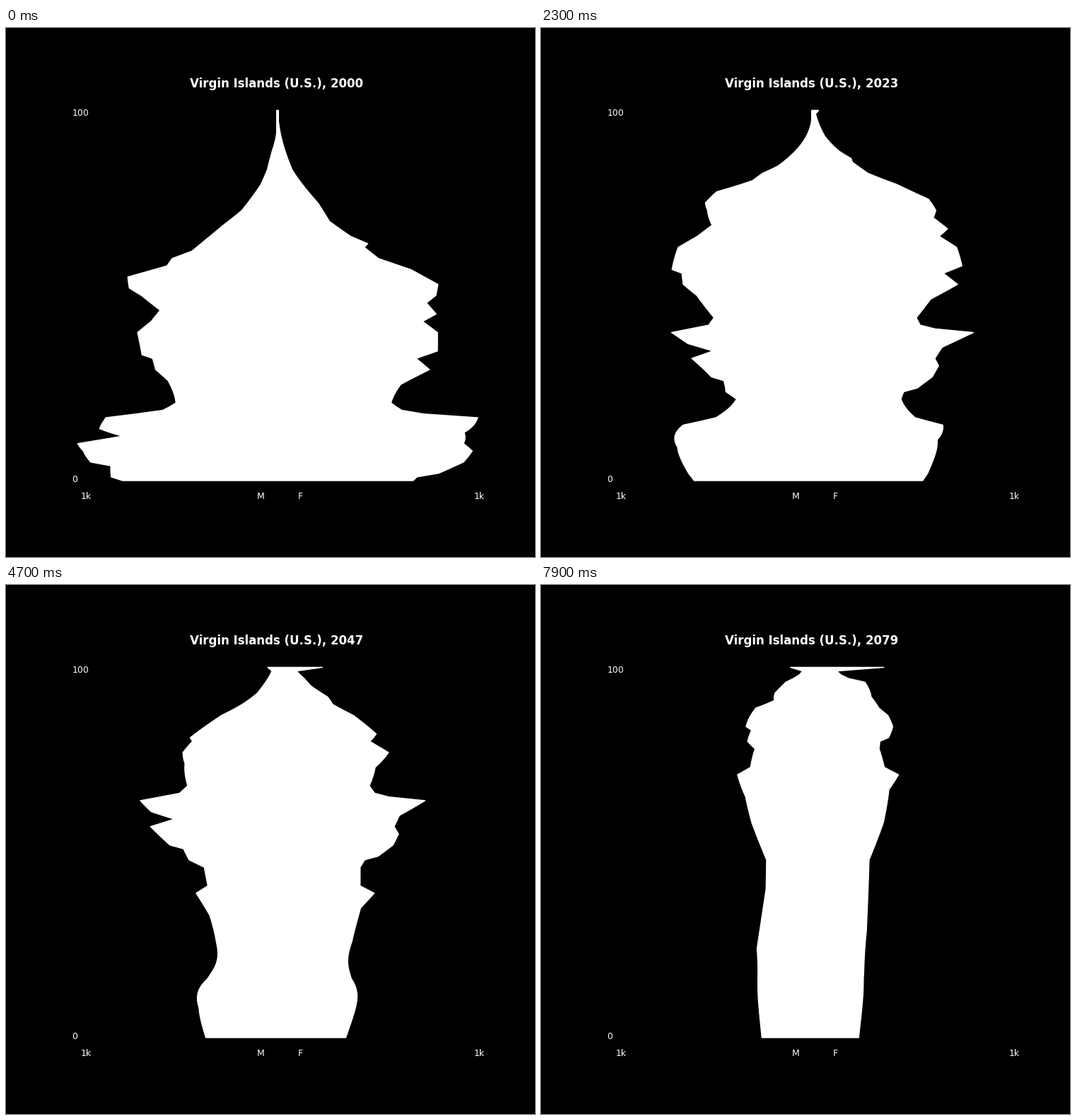
A matplotlib script for the animation above (8 s loop, 748 by 748 pixels).

```python
import numpy as np
import matplotlib.pyplot as plt
from matplotlib.animation import FuncAnimation

SIZE, DPI = 748, 100
FIRST, FRAMES = 2000, 80
MID = 384                    # x of the axis between the sexes
BASE, STEP = 640, 5.236      # y of age 0 and pixels per year of age
EDGE = 0.7                   # half of the outline width
OLDEST = 100                 # open group: this age and above
AGES = np.arange(OLDEST + 4)

# Key points (birth year, adult cohort size in pixels).
MEN = [
    (1900, 40), (1911, 60), (1916, 50), (1920, 54), (1927, 76), (1931, 101),
    (1938, 139), (1940, 167), (1942, 172), (1945, 228), (1948, 223),
    (1950, 204), (1954, 176), (1957, 191), (1960, 214), (1966, 213),
    (1967, 197), (1970, 193), (1973, 172), (1979, 148), (1981, 157),
    (1983, 215), (1986, 193), (1988, 156), (1990, 190), (1995, 159),
    (1996, 139), (1999, 131), (2001, 109), (2006, 105), (2008, 123),
    (2014, 103), (2021, 90), (2031, 67), (2039, 67), (2055, 79), (2079, 67)]
WOMEN = [
    (1900, 50), (1916, 60), (1925, 93), (1930, 101), (1934, 129),
    (1936, 154), (1937, 146), (1940, 163), (1943, 209), (1947, 244),
    (1950, 237), (1952, 221), (1955, 233), (1957, 212), (1960, 232),
    (1965, 230), (1967, 199), (1970, 217), (1974, 174), (1979, 151),
    (1981, 156), (1982, 177), (1983, 232), (1987, 186), (1990, 175),
    (1992, 180), (1995, 170), (1998, 147), (1999, 127), (2001, 120),
    (2006, 119), (2008, 139), (2012, 119), (2021, 105), (2031, 82),
    (2050, 77), (2079, 61)]

# Share of extra children who leave as young adults, by birth year.
BOYS = [(1980, 0.45), (1992, 0.6), (2002, 0.9), (2031, 1), (2047, 0.4),
        (2055, 0.08)]
GIRLS = [(2031, 0.56), (2047, 0.25), (2063, 0.08)]
AWAY = [(2000, 0.1), (2040, 0)]     # men absent around age 29


def curve(x, points):
    return np.interp(x, *zip(*points))


def survival(year, age, mode, gain, spread):
    """Gompertz curve whose modal age of death rises every year."""
    late = mode + gain * (year - FIRST)
    return np.exp(-np.exp((age - late) / spread))


def children(born, age, points):
    return 1 + curve(born, points) / (1 + np.exp((age - 16) / 2.6))


def half_width(size):
    """Visible widths for ages 0 to 99 and the open group, less the outline."""
    size = np.r_[size[:OLDEST], size[OLDEST:].sum()]
    return np.maximum(size, 2) - EDGE


def pyramid(year):
    born = year - AGES
    men = (curve(born, MEN) * children(born, AGES, BOYS)
           * survival(year, AGES, 82.2, 0.106, 10)
           * (1 - curve(born, AWAY) * np.exp(-((AGES - 29) / 15) ** 2)))
    women = (curve(born, WOMEN) * children(born, AGES, GIRLS)
             * survival(year, AGES, 83.5, 0.14, 11.5))
    return half_width(men), half_width(women)


fig = plt.figure(figsize=(SIZE / DPI, SIZE / DPI), dpi=DPI, facecolor="black")
ax = fig.add_axes([0, 0, 1, 1])
ax.set(xlim=(0, SIZE), ylim=(SIZE, 0))
ax.axis("off")


def label(x, y, text, **style):
    style = {"fontsize": 9, "ha": "center", **style}
    return ax.text(x, y, text, color="white", family="DejaVu Sans",
                   va="baseline", **style)


title = label(382.8, 84, "", fontsize=12, weight="bold")
label(93.5, 124, "100", ha="left")
label(93.5, 642, "0", ha="left")
for x, text in ((113, "1k"), (359.7, "M"), (416.5, "F"), (669.5, "1k")):
    label(x, 666, text)

shape, = ax.fill([0, 0, 0], [0, 0, 0], facecolor="white", edgecolor="white",
                 linewidth=1, joinstyle="round")
y = BASE - STEP * np.arange(OLDEST + 1)
outline_y = np.r_[y, y[::-1]]


def draw(i):
    men, women = pyramid(FIRST + i)
    x = np.r_[MID - men, (MID + women)[::-1]]
    shape.set_xy(np.column_stack([x, outline_y]))
    title.set_text(f"Virgin Islands (U.S.), {FIRST + i}")
    return shape, title


anim = FuncAnimation(fig, draw, frames=FRAMES, interval=100,
                     repeat=True, repeat_delay=0)
plt.show()
```
